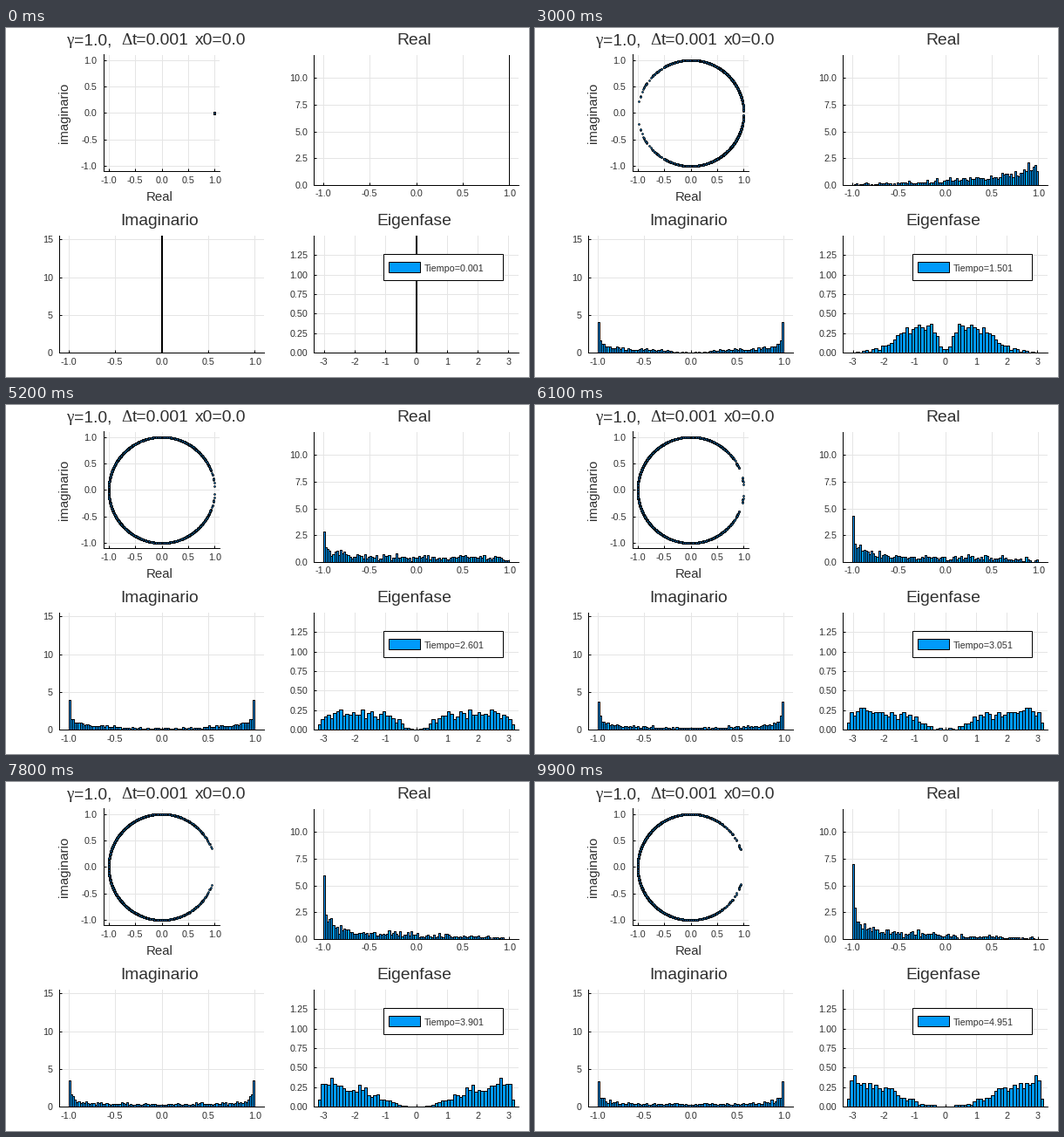
A matplotlib script that plays this animation: 600x400 px, repeating every 10 s.

```python
import numpy as np
import matplotlib.pyplot as plt
from matplotlib.animation import FuncAnimation
from matplotlib.collections import PolyCollection
from matplotlib.patches import Rectangle

W, H, DPI = 600, 400, 100
FRAMES, INTERVAL = 100, 100
PAIRS = 1000
BLUE, INK, GRID = "#009afa", "#303030", "#e5e5e5"
PX = 72 / DPI
TITLE, LABEL, TICK = 19.3 * PX, 15 * PX, 10.8 * PX

plt.rcParams["font.family"] = "Liberation Sans"
fig = plt.figure(figsize=(W / DPI, H / DPI), dpi=DPI, facecolor="white")


def write(x, y, s, size, **kw):
    """Text with its baseline at pixel (x, y), measured from the top left."""
    return fig.text(x / W, 1 - y / H, s, size=size, color=INK, **kw)


def panel(left, right, top, bottom, xlim, ylim, xticks, yticks, xfmt, yfmt):
    ax = fig.add_axes([left / W, 1 - bottom / H, (right - left) / W, (bottom - top) / H])
    ax.set(xlim=xlim, ylim=ylim, xticks=xticks, yticks=yticks)
    ax.set_xticklabels([])
    ax.set_yticklabels([])
    ax.grid(color=GRID, lw=PX)
    ax.set_axisbelow(True)
    ax.tick_params(direction="in", length=3 * PX, width=PX)
    ax.spines[["top", "right"]].set_visible(False)
    for side in ("left", "bottom"):
        ax.spines[side].set_linewidth(PX)
    for v in xticks:
        x = left + (v - xlim[0]) / (xlim[1] - xlim[0]) * (right - left)
        write(x, bottom + 13.5, format(v, xfmt), TICK, ha="center")
    for v in yticks:
        y = bottom - (v - ylim[0]) / (ylim[1] - ylim[0]) * (bottom - top)
        write(left - 7, y + 4, format(v, yfmt), TICK, ha="right")
    return ax


unit = (-1.1, 1.1)
halves = (-1, -0.5, 0, 0.5, 1)
ax_circle = panel(111.6, 245.4, 30.5, 164.3, unit, unit, halves, halves, ".1f", ".1f")
ax_real = panel(353, 588, 30.5, 179.7, unit, (0, 12.2), halves,
                (0, 2.5, 5, 7.5, 10), ".1f", ".1f")
ax_imag = panel(61, 296, 238, 372, unit, (0, 15.5), halves, (0, 5, 10, 15), ".1f", "d")
ax_phase = panel(353, 588, 238, 372, (-3.335, 3.335), (0, 1.5), range(-3, 4),
                 np.arange(0, 1.3, 0.25), "d", ".2f")

write(69.5, 19, "γ", TITLE, family="Liberation Serif")
write(77.5, 19, "=1.0,", TITLE)
write(132, 19, "Δ", TITLE, family="Liberation Serif")
write(144.5, 19, "t=0.001", TITLE)
write(216.5, 19, "x0=0.0", TITLE)
write(468, 19, "Real", TITLE, ha="center")
write(176, 226, "Imaginario", TITLE, ha="center")
write(468, 226, "Eigenfase", TITLE, ha="center")
write(176.5, 198, "Real", LABEL, ha="center")
write(67, 97.5, "imaginario", LABEL, ha="center", va="center", rotation=90)


def box(x0, y0, x1, y1, color, z):
    fig.add_artist(Rectangle((x0 / W, 1 - y1 / H), (x1 - x0) / W, (y1 - y0) / H,
                             fc=color, ec="black", lw=PX, zorder=z))


box(433, 259, 570, 289, "white", 5)
box(439, 268, 475, 280, BLUE, 6)
clock = write(480, 279, "", TICK, zorder=7)

dots, = ax_circle.plot([], [], "o", ms=1.8 * PX, mew=0.8 * PX, mfc=BLUE, mec="black")


def bars(ax):
    return ax.add_collection(
        PolyCollection([], facecolors=BLUE, edgecolors="black", linewidths=PX, zorder=2),
        autolim=False)


real_bars, imag_bars, phase_bars = map(bars, (ax_real, ax_imag, ax_phase))

rng = np.random.default_rng(12)
rank0 = rng.random(PAIRS)
drift = rng.normal(0, 0.08, PAIRS)


def phases(t):
    """Positive eigenphases: density sin(x/2)^p exp(-x^2 / 2s^2) on [0, pi]."""
    s = np.interp(t, [0, 0.8, 1.5, 2.2, 3.05, 3.9, 4.95],
                  [0, 0.465, 0.84, 1.35, 2.7, 4.3, 7])
    p = np.interp(t, [0, 2.2, 3.05, 3.9, 4.95], [1, 1, 1.5, 2, 2.3])
    x = np.linspace(0, min(np.pi, 5 * s), 1000)
    density = np.sin(x / 2) ** p * np.exp(-x**2 / (2 * s**2))
    cdf = np.cumsum(density)
    rank = np.abs((rank0 + drift * t + 1) % 2 - 1)
    return np.interp(rank, cdf / cdf[-1], x)


def nice_step(width):
    base = 10 ** np.floor(np.log10(width))
    return base * next(m for m in (1, 2, 5, 10) if width / base <= 1.1 * m or m == 10)


def fill(coll, values, nbins):
    lo, hi = values.min(), values.max()
    step = nice_step((hi - lo) / nbins)
    edges = np.arange(np.floor(lo / step), np.floor(hi / step) + 2) * step
    counts, _ = np.histogram(values, edges)
    top = np.minimum(counts / (len(values) * step), 1.3 * coll.axes.get_ylim()[1])
    coll.set_verts([[(a, 0), (a, h), (b, h), (b, 0)]
                    for a, b, h in zip(edges, edges[1:], top) if h > 0])


def update(i):
    t = 0.001 + 0.05 * i
    half = phases(t)
    theta = np.column_stack([-half, half]).ravel()
    re, im = np.cos(theta), np.sin(theta)
    dots.set_data(re, im)
    fill(real_bars, re, 92)
    fill(imag_bars, im, 92)
    fill(phase_bars, theta, 58)
    clock.set_text(f"Tiempo={t:.3f}")
    return dots, real_bars, imag_bars, phase_bars, clock


anim = FuncAnimation(fig, update, frames=FRAMES, interval=INTERVAL,
                     repeat=True, repeat_delay=0, blit=False)
plt.show()
```
